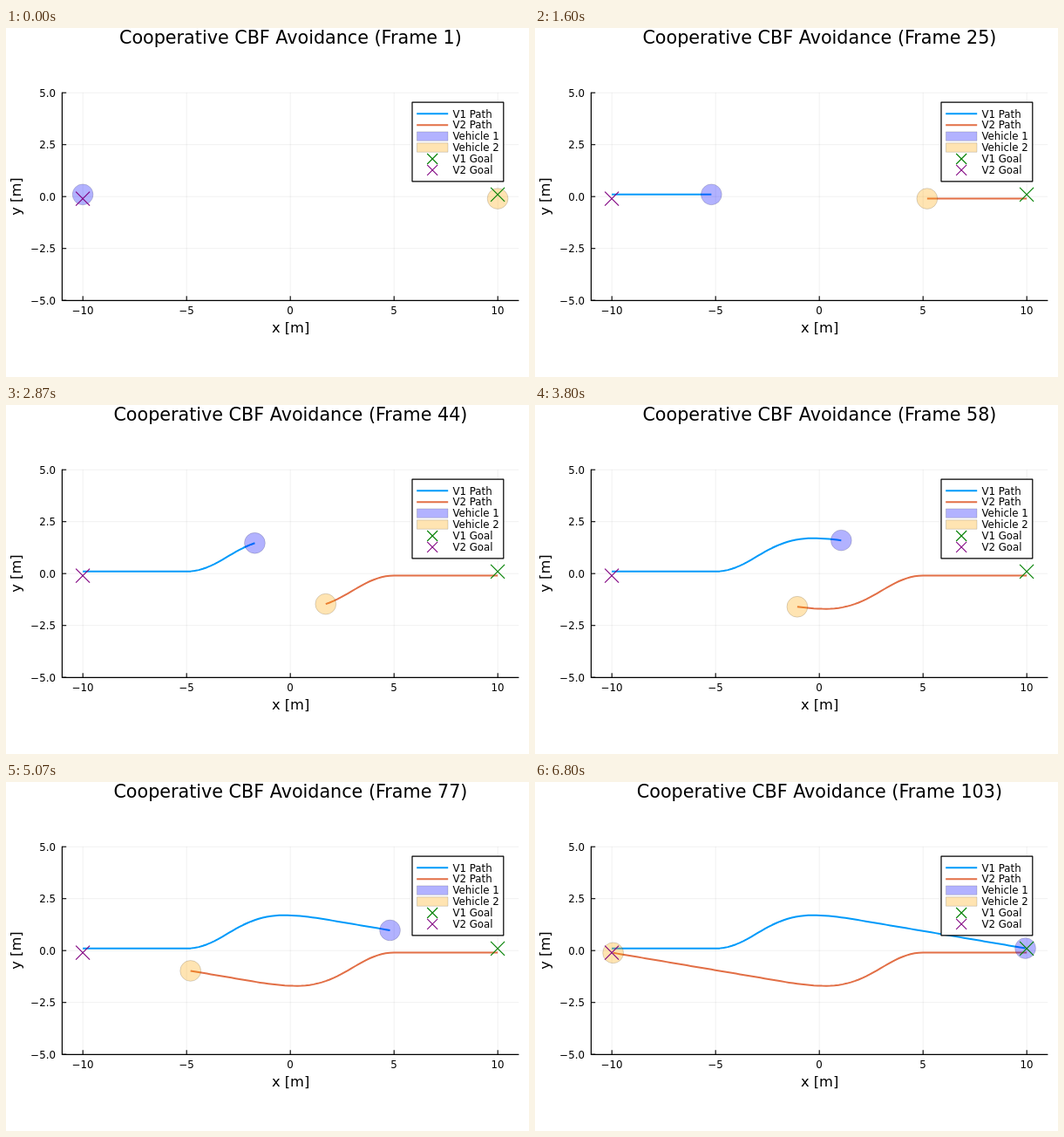
Animation, 600 px wide and 400 px high, one loop 6870 ms. Source, as an HTML page with a canvas:

```html
<!DOCTYPE html>
<html lang="en">
<head>
<meta charset="utf-8">
<title>Cooperative avoidance</title>
<style>
html, body { margin: 0; width: 100%; height: 100%; overflow: hidden; background: #fff; }
canvas { display: block; width: 600px; height: 400px; }
</style>
</head>
<body>
<canvas id="stage" width="600" height="400"></canvas>
<script>
const ctx = document.getElementById('stage').getContext('2d');
const LOOP = 6870, STEPS = 103, TURN = 25, UNIT = 23.8;
const BLUE = '#009afa', RED = '#e26f46', GREEN = '#008000', PURPLE = '#800080';
const FILL1 = 'rgba(0,0,255,0.3)', FILL2 = 'rgba(255,165,0,0.3)';
const px = x => 326.1 + x * UNIT;
const py = y => 193.2 - y * UNIT;

// Heading (rad) by step after the avoidance turn begins
const TURNS = [[0, 0], [4, 0.32], [8, 0.51], [11, 0.54], [14, 0.49], [18, 0.34],
  [21, 0.19], [25, 0], [29, -0.09], [34, -0.155]];

function heading(k, x, y) {
  if (k <= 0) return 0;
  for (let i = 1; i < TURNS.length; i++) {
    const [a, u] = TURNS[i - 1], [b, v] = TURNS[i];
    if (k < b) return u + (v - u) * (k - a) / (b - a);
  }
  return Math.atan2(0.1 - y, 10 - x);
}

// Constant speed: 0.2 m per step; the second vehicle mirrors the first
const path = [[-10, 0.1]];
for (let i = 0; i < STEPS - 1; i++) {
  const [x, y] = path[i];
  const h = heading(i - TURN + 0.5, x, y);
  path.push([x + 0.2 * Math.cos(h), y + 0.2 * Math.sin(h)]);
}

function line(color, width, ...pts) {
  ctx.strokeStyle = color;
  ctx.lineWidth = width;
  ctx.beginPath();
  pts.forEach(([x, y]) => ctx.lineTo(x, y));
  ctx.stroke();
}

function text(str, x, y, size, align) {
  ctx.font = size + 'px "DejaVu Sans", sans-serif';
  ctx.textAlign = align;
  ctx.fillStyle = '#000';
  ctx.fillText(str, x, y);
}

function cross(x, y, r, color) {
  line(color, 1.1, [x - r, y - r], [x + r, y + r]);
  line(color, 1.1, [x - r, y + r], [x + r, y - r]);
}

function paint(fill) {
  ctx.fillStyle = fill;
  ctx.fill();
  ctx.strokeStyle = 'rgba(0,0,0,0.15)';
  ctx.lineWidth = 1;
  ctx.stroke();
}

function axes() {
  const num = v => (v < 0 ? '\u2212' : '') + Math.abs(v);
  const grid = 'rgba(0,0,0,0.06)';
  for (let v = -10; v <= 10; v += 5) {
    const x = Math.round(px(v)) + 0.2;
    line(grid, 1, [x, 74.2], [x, 312.2]);
    line('#000', 1.1, [x, 312.2], [x, 307.2]);
    text(num(v), px(v), 328.3, 11.8, 'center');
  }
  for (let v = -5; v <= 5; v += 2.5) {
    const y = py(v);
    line(grid, 1, [64.3, y], [588.2, y]);
    line('#000', 1.1, [64.3, y], [69.2, y]);
    text((v < 0 ? '\u2212' : '') + Math.abs(v).toFixed(1), 57, y + 4.3, 11.8, 'right');
  }
  line('#000', 1.2, [64.4, 73.8], [64.4, 312.4], [588.4, 312.4]);
  text('x [m]', 326.6, 348.7, 16.3, 'center');
  ctx.save();
  ctx.translate(16.6, 193);
  ctx.rotate(-Math.PI / 2);
  text('y [m]', 0, 0, 16.3, 'center');
  ctx.restore();
}

function legend() {
  ctx.fillStyle = '#fff';
  ctx.fillRect(466, 85.2, 104.8, 90.6);
  ctx.strokeStyle = '#000';
  ctx.lineWidth = 1.2;
  ctx.strokeRect(466, 85.2, 104.8, 90.6);
  const row = i => 98.2 + i * 12.95;
  const patch = (y, fill) => {
    ctx.beginPath();
    ctx.rect(471.5, y - 5.2, 35.5, 10.4);
    paint(fill);
  };
  line(BLUE, 2, [471.2, row(0)], [507.2, row(0)]);
  line(RED, 2, [471.2, row(1)], [507.2, row(1)]);
  patch(row(2), FILL1);
  patch(row(3), FILL2);
  cross(489.2, row(4), 6, GREEN);
  cross(489.2, row(5), 6, PURPLE);
  ['V1 Path', 'V2 Path', 'Vehicle 1', 'Vehicle 2', 'V1 Goal', 'V2 Goal']
    .forEach((s, i) => text(s, 512.4, row(i) + 4.3, 11.8, 'left'));
}

function draw(n) {
  ctx.fillStyle = '#fff';
  ctx.fillRect(0, 0, 600, 400);
  ctx.lineJoin = 'round';
  text(`Cooperative CBF Avoidance (Frame ${n + 1})`, 326.4, 18.3, 20.7, 'center');
  axes();
  const trail = path.slice(0, n + 1);
  const at = sign => ([x, y]) => [px(sign * x), py(sign * y)];
  if (n > 0) {
    line(BLUE, 2, ...trail.map(at(1)));
    line(RED, 2, ...trail.map(at(-1)));
  }
  [[1, FILL1], [-1, FILL2]].forEach(([sign, fill]) => {
    ctx.beginPath();
    ctx.arc(...at(sign)(path[n]), UNIT / 2, 0, Math.PI * 2);
    paint(fill);
  });
  cross(px(10), py(0.1), 8, GREEN);
  cross(px(-10), py(-0.1), 8, PURPLE);
  legend();
}

// Steps run at 15 per second, rounded to 10 ms
const startOf = n => Math.round(n * 20 / 3) * 10;
let shown = -1;
function tick() {
  const t = performance.now() % LOOP;
  let n = Math.min(STEPS - 1, Math.floor(t * 0.015) + 1);
  while (n > 0 && startOf(n) > t) n--;
  if (n !== shown) draw(shown = n);
  requestAnimationFrame(tick);
}
tick();
</script>
</body>
</html>
```
